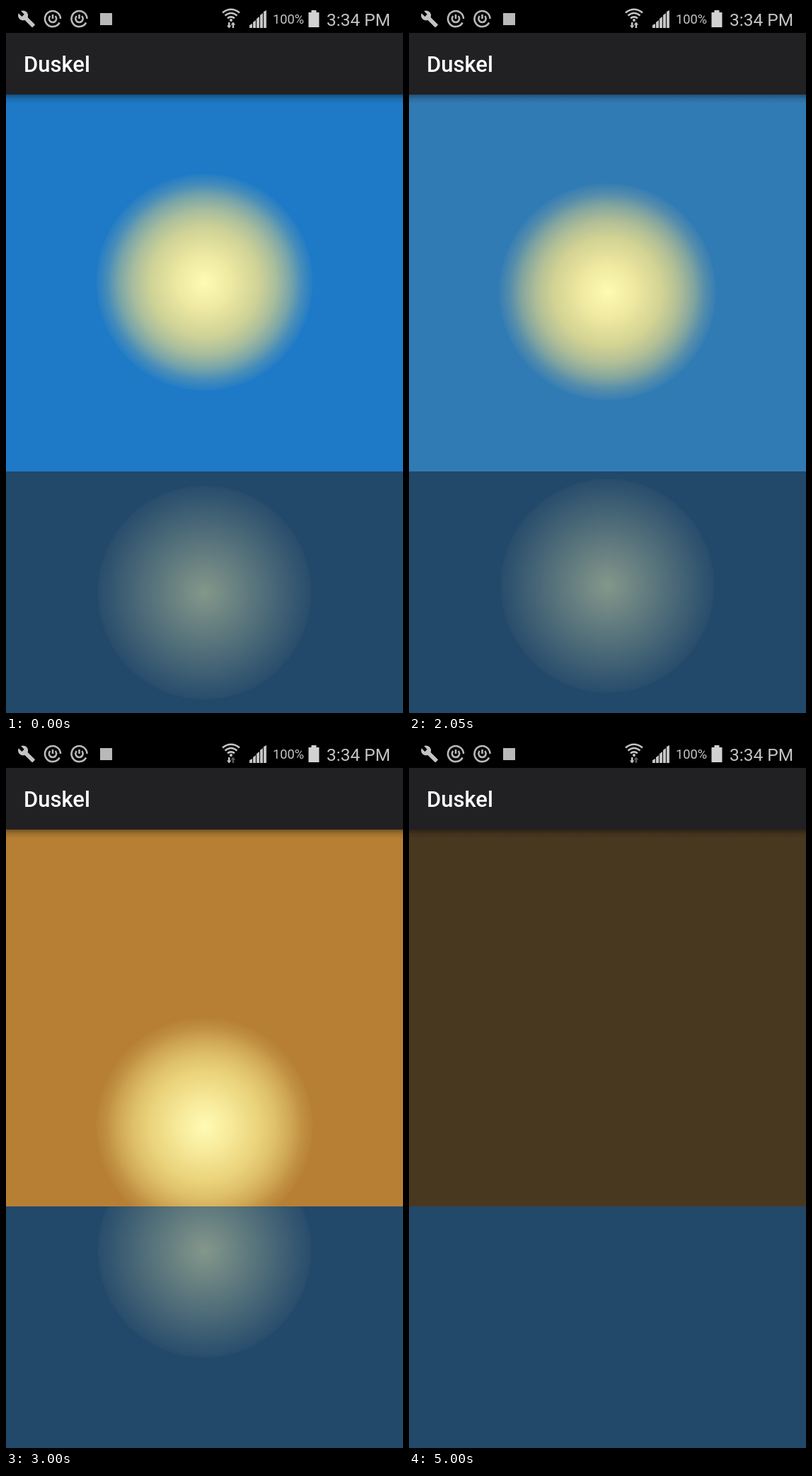
An HTML page for the animation above (5050 ms loop, 561 px wide and 998 px high).

```html
<!DOCTYPE html>
<html lang="en">
<head>
<meta charset="utf-8">
<title>Dusk</title>
<style>
  html, body { margin: 0; width: 100%; height: 100%; overflow: hidden; background: #000; }
  svg { display: block; width: 100%; height: 100%; }
  text { font-family: Roboto, sans-serif; }
</style>
</head>
<body>
<svg viewBox="0 0 561 998" preserveAspectRatio="none">
  <defs>
    <radialGradient id="glow">
      <stop offset="0" stop-color="#fffbb4"/>
      <stop offset=".25" stop-color="#fbf0a0" stop-opacity=".94"/>
      <stop offset=".5" stop-color="#f6e68c" stop-opacity=".82"/>
      <stop offset=".66" stop-color="#f4e286" stop-opacity=".65"/>
      <stop offset=".8" stop-color="#f2de80" stop-opacity=".42"/>
      <stop offset=".9" stop-color="#f0dc80" stop-opacity=".19"/>
      <stop offset="1" stop-color="#f0dc80" stop-opacity=".03"/>
    </radialGradient>
    <radialGradient id="shimmer">
      <stop offset="0" stop-color="#e6e6aa" stop-opacity=".5"/>
      <stop offset="1" stop-color="#e6e6aa" stop-opacity=".03"/>
    </radialGradient>
    <linearGradient id="shade" x2="0" y2="1">
      <stop offset="0" stop-color="#000" stop-opacity=".36"/>
      <stop offset=".45" stop-color="#000" stop-opacity=".12"/>
      <stop offset="1" stop-color="#000" stop-opacity="0"/>
    </linearGradient>
    <clipPath id="water"><rect y="657" width="561" height="341"/></clipPath>
    <g id="power" fill="none" stroke="#b9b9b9" stroke-width="2.6">
      <path d="M9.6 5.5A11 11 0 1 1 11 0"/>
      <path d="M-3.6-3.9A5.2 5.2 0 1 0 3.6-3.9M0-6V0"/>
    </g>
  </defs>

  <rect id="sky" y="125" width="561" height="532"/>
  <circle id="sun" cx="280.5" r="153" fill="url(#glow)"/>
  <rect y="657" width="561" height="341" fill="#22486a"/>
  <g clip-path="url(#water)">
    <circle id="mirror" cx="280.5" r="151" fill="url(#shimmer)"/>
  </g>

  <rect y="125" width="561" height="13" fill="url(#shade)"/>
  <rect y="38" width="561" height="87" fill="#212022"/>
  <text x="25" y="93" font-size="31" font-weight="500" fill="#fff">Duskel</text>

  <rect width="561" height="38"/>
  <path transform="translate(16 5.2) scale(1.08)" fill="#c4c4c4" d="M22.7 19l-9.1-9.1c.9-2.3.4-5-1.5-6.9-2-2-5-2.4-7.4-1.3L9 6 6 9 1.6 4.7C.4 7.1.9 10.1 2.9 12.1c1.9 1.9 4.6 2.4 6.9 1.5l9.1 9.1c.4.4 1 .4 1.4 0l2.3-2.3c.5-.4.5-1.1.1-1.4z"/>
  <use href="#power" x="66" y="18"/>
  <use href="#power" x="103.5" y="18"/>
  <rect x="133" y="10" width="17" height="17" fill="#b9b9b9"/>

  <g fill="none" stroke="#c4c4c4" stroke-width="2.5">
    <path d="M306 9.5Q318 0 330 9.5M309.5 13.5Q318 6.5 326.500 13.5M313 17.300Q318 13.500 323 17.300"/>
  </g>
  <circle cx="318" cy="20" r="2" fill="#c4c4c4"/>
  <path fill="#c4c4c4" d="M314 23h2.500v4.500h2l-3.300 4-3.300-4h2.100z"/>
  <path id="up" d="M319.700 31h2.500v-4.500h2l-3.300-4-3.300 4h2.100z"/>
  <path fill="#c4c4c4" d="M344 31v-4l4-2v6zM349 31v-8l4-3v11zM354 31v-13l4-3v16zM359 31v-18l4-3v21zM364 31v-23l4-2v25z"/>
  <text x="377" y="25" font-size="18.300" fill="#c4c4c4">100%</text>
  <path fill="#d2d2d2" d="M431.500 6h7v3h4v21h-15v-21h4z"/>
  <text x="453" y="27.500" font-size="24.500" fill="#c4c4c4">3:34 PM</text>
</svg>
<script>
const LOOP = 5050, STEP = 50;
const START = 1650, FADE = 2050;
const DAY = [30, 122, 199], DUSK = [236, 129, 0], NIGHT = [5, 25, 46];

const el = id => document.getElementById(id);
const sky = el('sky'), sun = el('sun'), mirror = el('mirror'), up = el('up');

const clamp = v => Math.min(1, Math.max(0, v));
const ease = v => 0.5 - 0.5 * Math.cos(Math.PI * clamp(v));
const mix = (a, b, f) => a.map((v, i) => v + (b[i] - v) * f);

function skyColor(t) {
  const dusk = mix(DAY, DUSK, ease((t - START) / FADE));
  return mix(dusk, NIGHT, ease((t - START - FADE) / FADE));
}

function draw(t) {
  // accelerating drop; the reflection rises more slowly
  const drop = Math.min(480, 8.45e-5 * Math.max(0, t - START) ** 2);
  sun.setAttribute('cy', 390 + drop);
  mirror.setAttribute('cy', 828 - 0.705 * drop);
  sky.setAttribute('fill', `rgb(${skyColor(t).map(Math.round)})`);
  up.setAttribute('fill', t < 2400 ? '#c4c4c4' : '#5c5c5c');
}

const begin = performance.now();
function tick() {
  const t = (performance.now() - begin) % LOOP;
  draw(Math.floor(t / STEP) * STEP);
  requestAnimationFrame(tick);
}
draw(0);
requestAnimationFrame(tick);
</script>
</body>
</html>
```
